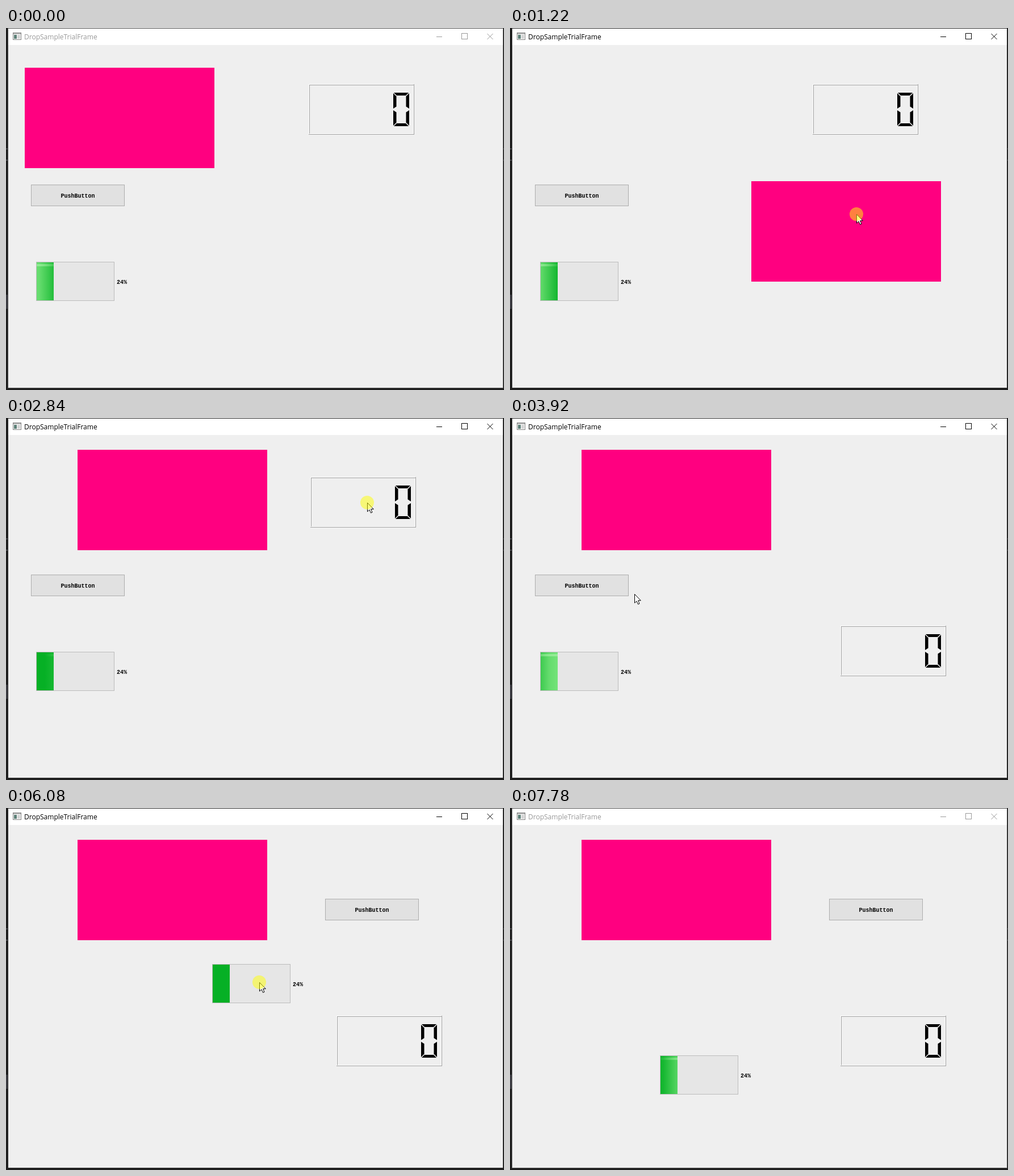
Recreate the animation shown at these times as an HTML page with a canvas. Size 877 by 638 pixels, loop 7850 ms.

```html
<!DOCTYPE html>
<html>
<head>
<meta charset="utf-8">
<style>
html, body { margin: 0; width: 100%; height: 100%; overflow: hidden; background: #1e1e1e; }
canvas { display: block; }
</style>
</head>
<body>
<canvas id="stage" width="877" height="638"></canvas>
<script>
const g = document.getElementById('stage').getContext('2d');
const LOOP = 7850, STEP = 76.95;
const MONO = 'bold 10px "Liberation Mono", monospace';
const ENTER = [876, 600], EXIT = [818, 590], EXIT_STEP = 91, GONE_STEP = 96;

// Each widget is dragged once, in this order. Path points: [step, x, y]
const panel = { grip: [185, 58], path: [[10, 33, 70], [11, 103, 41], [16, 425, 270], [22, 402, 75], [25, 189, 62], [27, 126, 56]] };
const lcd = { grip: [100, 45], path: [[36, 533, 99], [40, 546, 117], [42, 546, 117], [47, 582, 366]] };
const button = { grip: [105, 19], path: [[55, 44, 276], [58, 260, 331], [61, 495, 201], [64, 562, 160]] };
const bar = { grip: [83, 32], path: [[72, 53, 412], [77, 363, 275], [79, 363, 275], [84, 202, 433], [87, 264, 436]] };
const widgets = [panel, lcd, button, bar];
for (const w of widgets) {
  w.press = w.path[0][0] - 1;
  w.release = w.path[w.path.length - 1][0];
}

const mix = (a, b, p) => a.map((v, i) => Math.round(v + (b[i] - v) * p));

function place({ path }, n) {
  const i = path.findIndex(k => k[0] > n);
  if (i === 0) return path[0].slice(1);
  if (i < 0) return path[path.length - 1].slice(1);
  const [n0, ...from] = path[i - 1], [n1, ...to] = path[i];
  return mix(from, to, (n - n0) / (n1 - n0));
}

const gripAt = (w, n) => place(w, n).map((v, i) => v + w.grip[i]);

// The pointer follows a held widget, otherwise it eases out towards the next one
function pointer(n) {
  const held = widgets.find(w => n >= w.press && n <= w.release);
  if (held) return { held, pos: gripAt(held, n) };
  const next = widgets.find(w => w.press > n);
  const prev = widgets.filter(w => w.release < n).pop();
  const start = prev ? prev.release : 0;
  const end = next ? next.press : EXIT_STEP;
  const from = prev ? gripAt(prev, start) : ENTER;
  const to = next ? gripAt(next, end) : EXIT;
  const p = Math.min(1, (n - start) / (end - start));
  return { pos: mix(from, to, 1 - (1 - p) ** 2.4) };
}

function rect(color, x, y, w, h) {
  g.fillStyle = color;
  g.fillRect(x, y, w, h);
}

function frame(fill, edge, x, y, w, h) {
  rect(edge, x, y, w, h);
  rect(fill, x + 1, y + 1, w - 2, h - 2);
}

function text(str, font, color, x, y) {
  g.font = font;
  g.fillStyle = color;
  g.fillText(str, x, y);
}

function poly(fill, ...points) {
  g.beginPath();
  for (let i = 0; i < points.length; i += 2) g.lineTo(points[i], points[i + 1]);
  g.closePath();
  g.fillStyle = fill;
  g.fill();
}

function moved([x, y], draw) {
  g.save();
  g.translate(x, y);
  draw();
  g.restore();
}

function drawWindow(active) {
  rect('#1e1e1e', 0, 0, 877, 638);
  rect('#3c3c42', 0, 470, 4, 25);
  for (const x of [0, 875]) for (const y of [212, 232]) rect('#4a4a4e', x, y, 4, 2);
  rect(active ? '#2c2c2c' : '#505050', 3, 0, 873, 635);
  rect('#fff', 4, 1, 871, 29);
  rect('#efefef', 4, 30, 871, 604);

  frame('#fff', '#808080', 12, 8, 15, 13);
  rect('#b4b4b4', 13, 9, 13, 2);
  rect('#5d8078', 14, 12, 5, 7);
  rect('#d4d4d4', 20, 12, 5, 7);

  const ink = active ? '#000' : '#999';
  text('DropSampleTrialFrame', '12px "Open Sans", sans-serif', ink, 32, 20);
  rect(ink, 758, 15, 10, 1);
  g.strokeStyle = ink;
  g.lineWidth = 1;
  g.strokeRect(802.5, 9.5, 10, 10);
  g.beginPath();
  g.moveTo(847.5, 10); g.lineTo(857.5, 20);
  g.moveTo(857.5, 10); g.lineTo(847.5, 20);
  g.stroke();
}

function drawLcd() {
  // Raised outline: light then dark at top left, the reverse at bottom right
  rect('#fff', 0, 0, 186, 1);
  rect('#fff', 0, 0, 1, 88);
  rect('#a0a0a0', 1, 1, 184, 1);
  rect('#a0a0a0', 1, 1, 1, 86);
  rect('#fff', 184, 2, 1, 86);
  rect('#fff', 2, 87, 183, 1);
  rect('#a0a0a0', 185, 0, 1, 89);
  rect('#a0a0a0', 0, 88, 186, 1);

  // The digit is symmetric about both axes
  for (const sx of [1, -1]) for (const sy of [1, -1]) {
    moved([163, 44.5], () => {
      g.scale(sx, sy);
      poly('#000', -14, -28.5, -8.5, -23, -8.5, -5, -14, -1.5);
      poly('#000', 0, -29.5, -13, -29.5, -8, -24.5, 0, -24.5);
    });
  }
}

function drawButton(pressed, hover) {
  const [fill, edge] = pressed ? ['#cce4f7', '#005499'] : hover ? ['#e5f1fb', '#0078d7'] : ['#e1e1e1', '#adadad'];
  frame(fill, edge, 0, 0, 165, 38);
  text('PushButton', MONO, '#000', 52.5, 23);
}

function shine(color, lead) {
  const grad = g.createLinearGradient(lead - 119, 0, lead + 1, 0);
  for (let p = 0; p <= 1; p += .125) {
    grad.addColorStop(p, `rgba(${color},${(Math.sin(p * Math.PI) ** 2).toFixed(3)})`);
  }
  return grad;
}

function drawBar(n) {
  frame('#e6e6e6', '#bcbcbc', 0, 0, 138, 69);
  rect('#06b025', 1, 1, 30, 67);
  const lead = (n * 77 + 200) % 1256 / 4;
  rect(shine('116,227,121', lead), 1, 1, 30, 67);
  rect(shine('150,236,152', lead), 1, 4, 30, 4);
  text('24%', MONO, '#000', 142, 39);
}

function drawPointer(held) {
  poly('#fff', .5, .5, .5, 16, 4, 12.8, 6.5, 18.3, 9, 17.2, 6.6, 11.7, 11.3, 11.7);
  g.strokeStyle = '#000';
  g.lineWidth = 1;
  g.stroke();
  if (!held) return;
  g.beginPath();
  g.arc(0, 0, 12, 0, 7);
  g.fillStyle = 'rgba(255,255,0,.5)';
  g.fill();
}

function render(now) {
  const n = Math.min(101, Math.floor((now % LOOP + 16) / STEP));
  const { held, pos } = pointer(n);
  const [bx, by] = place(button, n);
  const hover = !held && pos[0] >= bx && pos[0] < bx + 165 && pos[1] >= by && pos[1] < by + 38;

  drawWindow(n >= panel.press && n < GONE_STEP);
  rect('#ff0080', ...place(panel, n), 334, 177);
  moved([bx, by], () => drawButton(held === button, hover));
  moved(place(lcd, n), drawLcd);
  moved(place(bar, n), () => drawBar(n));
  if (n > 0 && n < GONE_STEP) moved(pos, () => drawPointer(held));
}

const start = performance.now();
(function tick() {
  render(performance.now() - start);
  requestAnimationFrame(tick);
})();
</script>
</body>
</html>
```
